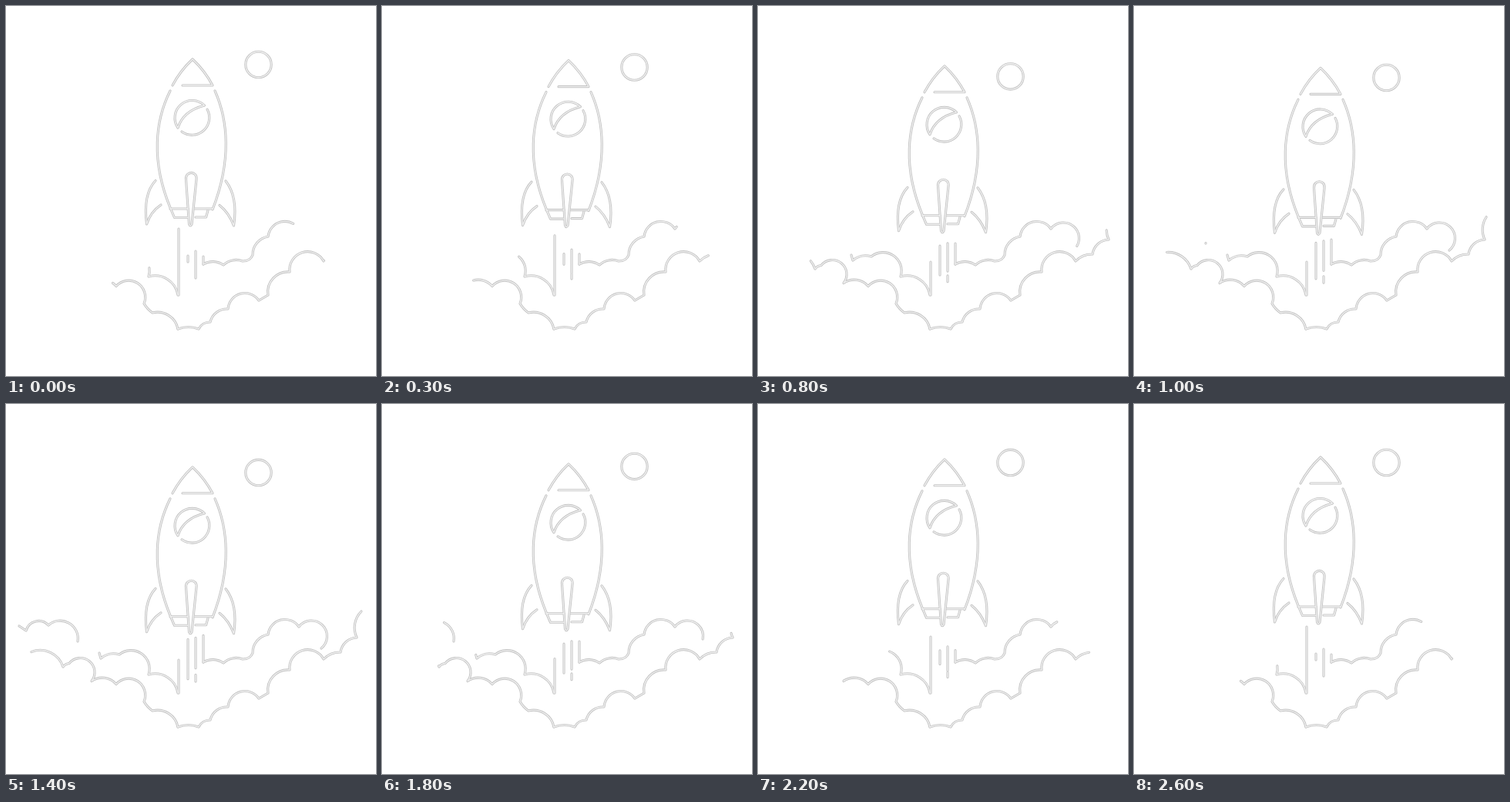
Recreate the animation shown at these times as an HTML page. Size 480 px wide and 480 px high, loop 2.7 s.

```html
<!DOCTYPE html>
<html lang="en">
<head>
<meta charset="utf-8">
<title>Rocket launch</title>
<style>
  html, body { margin: 0; width: 100%; height: 100%; overflow: hidden; background: #fff; }
  svg { display: block; width: 100vw; height: 100vh; fill: none;
        stroke-linecap: round; stroke-linejoin: round; }
  .edge { stroke: #c2c2c2; stroke-width: 3.1; }
  .core { stroke: #efefef; stroke-width: 1.4; }
</style>
</head>
<body>
<svg viewBox="0 0 480 480">
  <defs>
    <g id="art">
      <circle id="moon" cx="327.5" cy="76" r="16.7"/>
      <g id="rocket">
        <path d="M216 103Q226 84 242 69Q258 84 268 103H229"/>
        <path d="M213 110C194 148 187 200 214 264M271 110C288 148 293 200 268 264"/>
        <path d="M257.4 129A22.6 22.6 0 0 0 223 158Q230 136 257.4 129M261 134A22.5 22.5 0 0 1 228 163"/>
        <path d="M213 263H236M245 263H268M214 264L218.5 274.5H236M246 274H259.5L262 265"/>
        <path d="M237.5 283L233.5 225C232.5 213.5 248.5 213.5 247 225L241 283Q239 287 237.5 283"/>
        <path d="M194 226.5C183 238 179 255 182.5 283C186 272 192 264 201 258"/>
        <path d="M285 227C296 241 299 262 295.5 285Q289 268 277 258.5"/>
      </g>
      <path id="bars"/>
      <path id="lowLeft" d="M223 419A27 27 0 0 0 190 398Q183 393 179 386A21.5 21.5 0 0 0 143 363.5A24 24 0 0 0 111 359.5A18.5 18.5 0 0 0 82 336.5Q77 337 74 341A31 31 0 0 0 30 323"/>
      <path id="lowRight" d="M223 419Q237 414 250 419A16 16 0 0 1 265 410A22 22 0 0 1 288 393A22 22 0 0 1 328 382L340 375A26 26 0 0 1 368 345A23.5 23.5 0 0 1 412 331A30 30 0 0 1 434 322A22 22 0 0 1 455 303A30 30 0 0 1 462 268"/>
      <path id="highRight" d="M256 335A24 24 0 0 1 282 336A24 24 0 0 1 307 331Q317 331 320 323A24 24 0 0 1 340 299A22 22 0 0 1 380 289A20.3 20.3 0 1 1 409 317"/>
      <path id="highLeft" d="M223 375A30 30 0 0 0 185 351A24 24 0 0 0 147 325Q134 321 123 330L121 323"/>
      <path id="puff" d="M93 308A23 23 0 0 0 55 287A17 17 0 0 0 26 294L17 288"/>
    </g>
  </defs>
  <use class="edge" href="#art"/>
  <use class="core" href="#art"/>
</svg>
<script>
const LOOP = 2700, STEP = 100;
const PUFF_DELAY = 170, PUFF_START = 0.745;
const $ = id => document.getElementById(id);

// Eases from 0 to 1 during rise, then back to 0 during fall.
function wave(t, rise, fall) {
  const phase = t < rise ? t / rise : 1 + Math.min(1, (t - rise) / fall);
  return 0.5 - 0.5 * Math.cos(Math.PI * phase);
}

// Length along a path at the place closest to a point.
function lengthNear(path, x, y) {
  const total = path.getTotalLength();
  let best = 0, bestGap = Infinity;
  for (let s = 0; s <= total; s += 0.5) {
    const p = path.getPointAtLength(s), gap = Math.hypot(p.x - x, p.y - y);
    if (gap < bestGap) { bestGap = gap; best = s; }
  }
  return best;
}

// A trail rests with its tip at (x, y) and grows to its full length.
function makeTrail(id, x, y, rate) {
  const path = $(id), rest = lengthNear(path, x, y);
  return { path, rest, growth: (path.getTotalLength() - rest) * rate };
}
const trails = [
  makeTrail("lowLeft", 138, 361, 1),
  makeTrail("lowRight", 412, 331, 1),
  makeTrail("highRight", 372, 282, 1.25),
  makeTrail("highLeft", 185, 340, 1.5)
];
const puffLength = $("puff").getTotalLength();

function reveal(path, length) {
  path.style.visibility = length > 0 ? "visible" : "hidden";
  path.setAttribute("stroke-dasharray", `${Math.max(length, 0)} 9999`);
}

const bar = (x, top, bottom) => `M${x} ${top}V${bottom}`;

function draw(t) {
  const lift = wave(t, 1300, 1300);
  const smoke = wave(t, 1250, 1350);
  const lateSmoke = wave(Math.max(0, t - PUFF_DELAY), 1250, 1350);

  $("rocket").setAttribute("transform", `translate(0 ${13 * lift})`);
  $("moon").setAttribute("cy", 76 + 17 * wave(t, 1000, 1250));
  for (const { path, rest, growth } of trails) reveal(path, rest + growth * smoke);
  reveal($("puff"), puffLength * (lateSmoke - PUFF_START) / (1 - PUFF_START));

  const gap = 4.25 * lift;
  $("bars").setAttribute("d",
    bar(224, 289 + 43 * Math.min(1, 1.5 * smoke), 375) +
    bar(236, 324 - 19 * lift, 332 + 25 * lift) +
    bar(246, 318 - 15 * lift, 347 - gap) +
    bar(246, 347 + gap, 353 + 7 * lift) +
    bar(256, 325 - 25 * lift, 335));
}

function tick() {
  const t = performance.now() % LOOP;
  draw(Math.floor(t / STEP) * STEP);
  requestAnimationFrame(tick);
}
tick();
</script>
</body>
</html>
```
